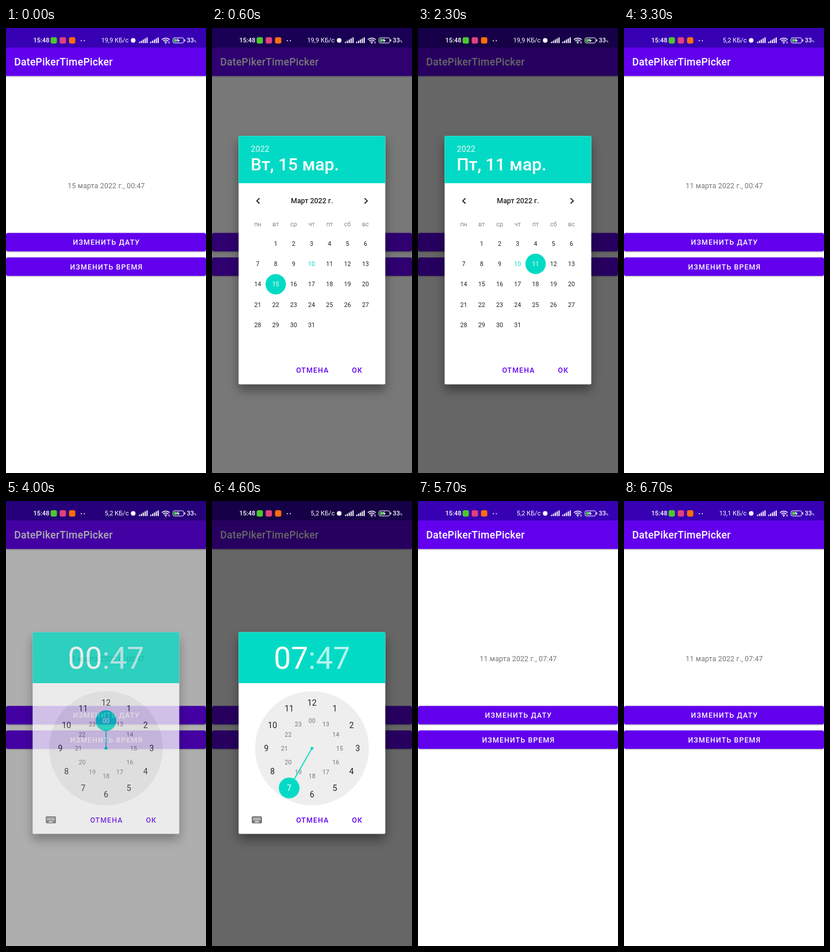
An HTML page that plays this animation: 348x772 px, repeating every 7000 ms.

```html
<!DOCTYPE html>
<html lang="ru">
<head>
<meta charset="utf-8">
<title>DatePikerTimePicker</title>
<style>
:root { --t: 0ms; --teal: #03dac5; --purple: #6200ee; --swap: 4690ms; --inout: cubic-bezier(.37, 0, .63, 1); }
html, body { margin: 0; width: 100%; height: 100%; overflow: hidden; background: #fff; }
svg { display: block; width: 100%; height: 100%; }
text { font-family: Roboto, sans-serif; white-space: pre; }
.mid { text-anchor: middle; }
.end { text-anchor: end; }
.bold { font-weight: 500; }
.teal { fill: var(--teal); }
.white { fill: #fff; }
.faint { fill: #ffffffb3; }
.title { font-size: 17.72px; font-weight: 500; letter-spacing: .0125em; }
.label { font-size: 12.4px; fill: #757575; letter-spacing: .012em; }
.btn { font-size: 12.4px; font-weight: 500; letter-spacing: .0893em; text-anchor: middle; }
.small { font-size: 10.63px; text-anchor: middle; }
.big { font-size: 14.18px; text-anchor: middle; }
.status { font-size: 11px; font-weight: 500; fill: #fff; }
.time { font-size: 53.2px; }
.bar { fill: var(--purple); filter: drop-shadow(0 1.2px 1.2px #0005); }
.panel { fill: #fff; filter: drop-shadow(0 10px 9px #0006); }

/* The page clock is --t; every animation is paused and placed by its delay. */
@keyframes show { from { opacity: 0 } }
@keyframes hide { to { opacity: 0 } }
@keyframes turn { from { transform: rotate(210deg) } to { transform: rotate(282deg) } }
@keyframes dot { from { r: 0px } }
@keyframes ripple {
  from { r: 20px; opacity: .24 }
  55% { opacity: .24 }
  to { r: 230px; opacity: 0 }
}
@keyframes tap {
  from { r: 12px; opacity: .08 }
  60% { opacity: .08 }
  to { r: 70px; opacity: 0 }
}
.when {
  animation: show 1ms linear calc(var(--on, -9ms) - var(--t)) both paused,
             hide 1ms linear calc(var(--off, 9000ms) - var(--t)) forwards paused;
}
.dim {
  opacity: .6;
  animation: show 300ms cubic-bezier(.5, 1, .89, 1) calc(var(--open) - var(--t)) both paused,
             hide 190ms linear calc(var(--close) - var(--t)) forwards paused;
}
.card {
  animation: show 185ms cubic-bezier(.5, 1, .89, 1) calc(var(--open) - var(--t)) both paused,
             hide 150ms linear calc(var(--close) - var(--t)) forwards paused;
}
.ripple { fill: #fff; opacity: 0; animation: ripple 350ms linear calc(var(--at) - var(--t)) paused; }
.tap { fill: var(--purple); opacity: 0; animation: tap 250ms linear calc(var(--at) - var(--t)) paused; }
.hours { animation: hide 500ms var(--inout) calc(var(--swap) - var(--t)) both paused; }
.minutes { animation: show 500ms var(--inout) calc(var(--swap) - var(--t)) both paused; }
.hand { transform-origin: 174px 429px; animation: turn 500ms var(--inout) calc(var(--swap) - var(--t)) both paused; }
.dot { r: 2px; fill: #fff; animation: dot 500ms var(--inout) calc(var(--swap) - var(--t)) both paused; }
</style>
</head>
<body>
<svg viewBox="0 0 348 772" preserveAspectRatio="none">
  <defs>
    <clipPath id="dateBtn"><rect y="355.6" width="348" height="31.9" rx="3.5"/></clipPath>
    <clipPath id="timeBtn"><rect y="398.1" width="348" height="31.9" rx="3.5"/></clipPath>
    <clipPath id="okBtn"><rect x="238.5" y="537" width="53.5" height="32.3" rx="2"/></clipPath>
    <clipPath id="handClip"><circle class="hand" cx="174" cy="349.5" r="18"/></clipPath>
  </defs>

  <!-- Main screen -->
  <rect width="348" height="772" fill="#fff"/>
  <rect class="bar" y="20" width="348" height="63.2"/>
  <rect width="348" height="33.8" fill="#3700b3"/>
  <text class="title white" x="14.2" y="65.2">DatePikerTimePicker</text>
  <g class="label mid">
    <text class="when" style="--off:2660ms" x="174.5" y="278.3">15 марта 2022 г., 00:47</text>
    <text class="when" style="--on:2660ms;--off:5505ms" x="174.5" y="278.3">11 марта 2022 г., 00:47</text>
    <text class="when" style="--on:5505ms" x="174.5" y="278.3">11 марта 2022 г., 07:47</text>
  </g>
  <rect class="bar" y="355.6" width="348" height="31.9" rx="3.5"/>
  <g clip-path="url(#dateBtn)"><circle class="ripple" style="--at:60ms" cx="190" cy="372"/></g>
  <text class="btn white" x="174.9" y="376.2">ИЗМЕНИТЬ ДАТУ</text>
  <rect class="bar" y="398.1" width="348" height="31.9" rx="3.5"/>
  <g clip-path="url(#timeBtn)"><circle class="ripple" style="--at:3660ms" cx="190" cy="414"/></g>
  <text class="btn white" x="174.9" y="418.7">ИЗМЕНИТЬ ВРЕМЯ</text>

  <!-- Date dialog -->
  <g style="--open:402ms;--close:2660ms">
    <rect class="dim" width="348" height="772"/>
    <g class="card">
      <rect class="panel" x="46.3" y="187.2" width="255.2" height="431" rx="2"/>
      <path class="teal" d="M46.3 269.3V189.2a2 2 0 0 1 2-2H299.5a2 2 0 0 1 2 2V269.3z"/>
      <text class="faint bold" x="67.6" y="214.6" font-size="14.18">2022</text>
      <g class="white bold" font-size="30.1">
        <text class="when" style="--off:850ms" x="67.2" y="246.8">Вт, 15 мар.</text>
        <text class="when" style="--on:850ms" x="67.2" y="246.8">Пт, 11 мар.</text>
      </g>
      <path d="M82.6 295.3L78 299.9l4.6 4.6M265.6 295.3l4.6 4.6l-4.6 4.6" fill="none" stroke="#212121" stroke-width="1.8"/>
      <text class="mid bold" x="174" y="304.3" font-size="12.4" fill="#212121">Март 2022 г.</text>
      <g id="days" class="small" fill="#212121"></g>
      <g id="dateActions" transform="translate(0 40.7)"></g>
    </g>
  </g>

  <!-- Time dialog -->
  <g style="--open:3906ms;--close:5505ms">
    <rect class="dim" width="348" height="772"/>
    <g class="card">
      <rect class="panel" x="46.3" y="227.6" width="255.2" height="350" rx="2"/>
      <path class="teal" d="M46.3 316V229.6a2 2 0 0 1 2-2H299.5a2 2 0 0 1 2 2V316z"/>
      <g class="time">
        <g class="end">
          <text class="white when" style="--off:4560ms" x="167.4" y="290.8">00</text>
          <text class="white when" style="--on:4560ms;--off:4690ms" x="167.4" y="290.8">07</text>
          <text class="faint when" style="--on:4690ms" x="167.4" y="290.8">07</text>
        </g>
        <text class="faint mid" x="174" y="290.8">:</text>
        <text class="faint when" style="--off:4690ms" x="180.6" y="290.8">47</text>
        <text class="white when" style="--on:4690ms" x="180.6" y="290.8">47</text>
      </g>
      <circle cx="174" cy="429" r="99" fill="#eee"/>
      <g id="dial" fill="#212121"></g>
      <circle class="teal" cx="174" cy="429" r="2.6"/>
      <g class="when" style="--off:4560ms">
        <path d="M174 429V381" stroke="var(--teal)" stroke-width="1.8"/>
        <circle class="teal" cx="174" cy="381" r="18"/>
        <text class="small white" x="174" y="384.8">00</text>
      </g>
      <g class="when" style="--on:4560ms">
        <g class="hand">
          <path d="M174 429V350" stroke="var(--teal)" stroke-width="1.8"/>
          <circle class="teal" cx="174" cy="349.5" r="18"/>
          <circle class="dot" cx="174" cy="349.5"/>
        </g>
        <g id="picked" class="white" clip-path="url(#handClip)"></g>
      </g>
      <rect x="69.2" y="546.9" width="17.7" height="12.4" rx="1.8" fill="#757575"/>
      <path d="M71.8 550.4h12.5M71.8 553.1h12.5" stroke="#fff" stroke-width="1.77" stroke-dasharray="1.77 .89"/>
      <path d="M74.5 556.6h7.1" stroke="#fff" stroke-width="1.77"/>
      <g id="timeActions"></g>
    </g>
  </g>

  <!-- Status bar -->
  <g class="status">
    <text x="47.6" y="25.4">15:48</text>
    <rect x="77.6" y="16" width="11" height="11" rx="3" fill="#4cc82e"/>
    <rect x="93.4" y="16" width="11" height="11" rx="3" fill="#e2407c"/>
    <rect x="109.6" y="16" width="11" height="11" rx="3" fill="#ff6d0a"/>
    <circle cx="131" cy="22" r="1"/>
    <circle cx="136.3" cy="22" r="1"/>
    <g class="end" font-weight="400">
      <text class="when" style="--off:3050ms" x="213.4" y="25.4">19,9 КБ/с</text>
      <text class="when" style="--on:3050ms;--off:6650ms" x="213.4" y="25.4">5,2 КБ/с</text>
      <text class="when" style="--on:6650ms" x="213.4" y="25.4">13,1 КБ/с</text>
    </g>
    <circle cx="221.3" cy="21.5" r="4"/>
    <g id="signal"></g>
    <path d="M271.2 20.2a9.6 9.6 0 0 1 13.6 0M273.5 22.6a6.3 6.3 0 0 1 9 0M275.8 24.8a3.1 3.1 0 0 1 4.4 0" fill="none" stroke="#fff" stroke-width="1.5"/>
    <circle cx="278" cy="26.4" r="1"/>
    <text x="282.3" y="27.3" font-size="5" style="font-size:5px">6</text>
    <rect x="290.6" y="17" width="18.6" height="9" rx="2.4" fill="none" stroke="#fff"/>
    <rect x="310.3" y="19.6" width="1.5" height="3.8" rx=".7"/>
    <rect x="292.3" y="18.7" width="5" height="5.6" rx="1" fill="#45d14a"/>
    <path d="M300.6 17.6l-4.4 4.5h3l-1 3.4l4.4-4.6h-3z"/>
    <text x="314.6" y="25.4">33</text>
    <text x="327" y="25.4" style="font-size:6px">%</text>
  </g>
</svg>
<script>
const LOOP = 7000, STEP = 100;
const $ = id => document.getElementById(id);
const label = (x, y, s, cls = '', style = '') =>
  `<text class="${cls}" style="${style}" x="${x.toFixed(2)}" y="${y.toFixed(2)}">${s}</text>`;
const range = n => [...Array(n).keys()];

// Calendar: the month starts on a Tuesday.
const colX = c => 79.6 + 31.25 * c;
const rowY = r => 373.8 + 35.4 * r;
const place = d => [colX(d % 7), rowY(Math.floor(d / 7))];
const picked = (d, style) => {
  const [x, y] = place(d);
  return `<g class="when" style="${style}"><circle class="teal" cx="${x}" cy="${y}" r="17.7"/>${label(x, y + 3.8, d, 'white')}</g>`;
};
$('days').innerHTML =
  ['пн', 'вт', 'ср', 'чт', 'пт', 'сб', 'вс'].map((s, i) => label(colX(i), 344, s, '', 'fill:#858585')).join('') +
  range(31).map(i => {
    const [x, y] = place(i + 1);
    return label(x, y + 3.8, i + 1, i === 9 ? 'teal' : '');
  }).join('') +
  picked(15, '--off:850ms') + picked(11, '--on:850ms');

// Clock face
const ring = (names, radius, size, drop, style) => names.map((s, i) => {
  const a = i * Math.PI / 6;
  return label(174 + radius * Math.sin(a), 429 - radius * Math.cos(a) + drop, s, size, style);
}).join('');
const pad = n => String(n).padStart(2, '0');
const outer = ring(range(12).map(i => i || 12), 79.5, 'big', 5.1);
const inner = ring(range(12).map(i => i ? i + 12 : '00'), 48, 'small', 3.8, 'fill:#757575');
const mins = ring(range(12).map(i => pad(i * 5)), 79.5, 'big', 5.1);
const face = hours => `<g class="hours">${hours}</g><g class="minutes">${mins}</g>`;
$('dial').innerHTML = face(outer + inner);
$('picked').innerHTML = face(outer);

// Dialog buttons
const actions = at => `
  <g clip-path="url(#okBtn)"><circle class="tap" style="--at:${at}ms" cx="265" cy="562"/></g>
  <g fill="var(--purple)">${label(175, 557.7, 'ОТМЕНА', 'btn')}${label(252.8, 557.7, 'ОК', 'btn')}</g>`;
$('dateActions').innerHTML = actions(2540);
$('timeActions').innerHTML = actions(5440);

$('signal').innerHTML = [231.4, 250.8].map(x => range(5).map(i => {
  const h = 2.4 + 1.9 * i;
  return `<rect x="${x + 3.25 * i}" y="${26.2 - h}" width="2" height="${h}" rx=".6"/>`;
}).join('')).join('');

const start = performance.now();
function tick() {
  const t = (performance.now() - start) % LOOP;
  document.documentElement.style.setProperty('--t', Math.floor(t / STEP) * STEP + 'ms');
  requestAnimationFrame(tick);
}
tick();
</script>
</body>
</html>
```
